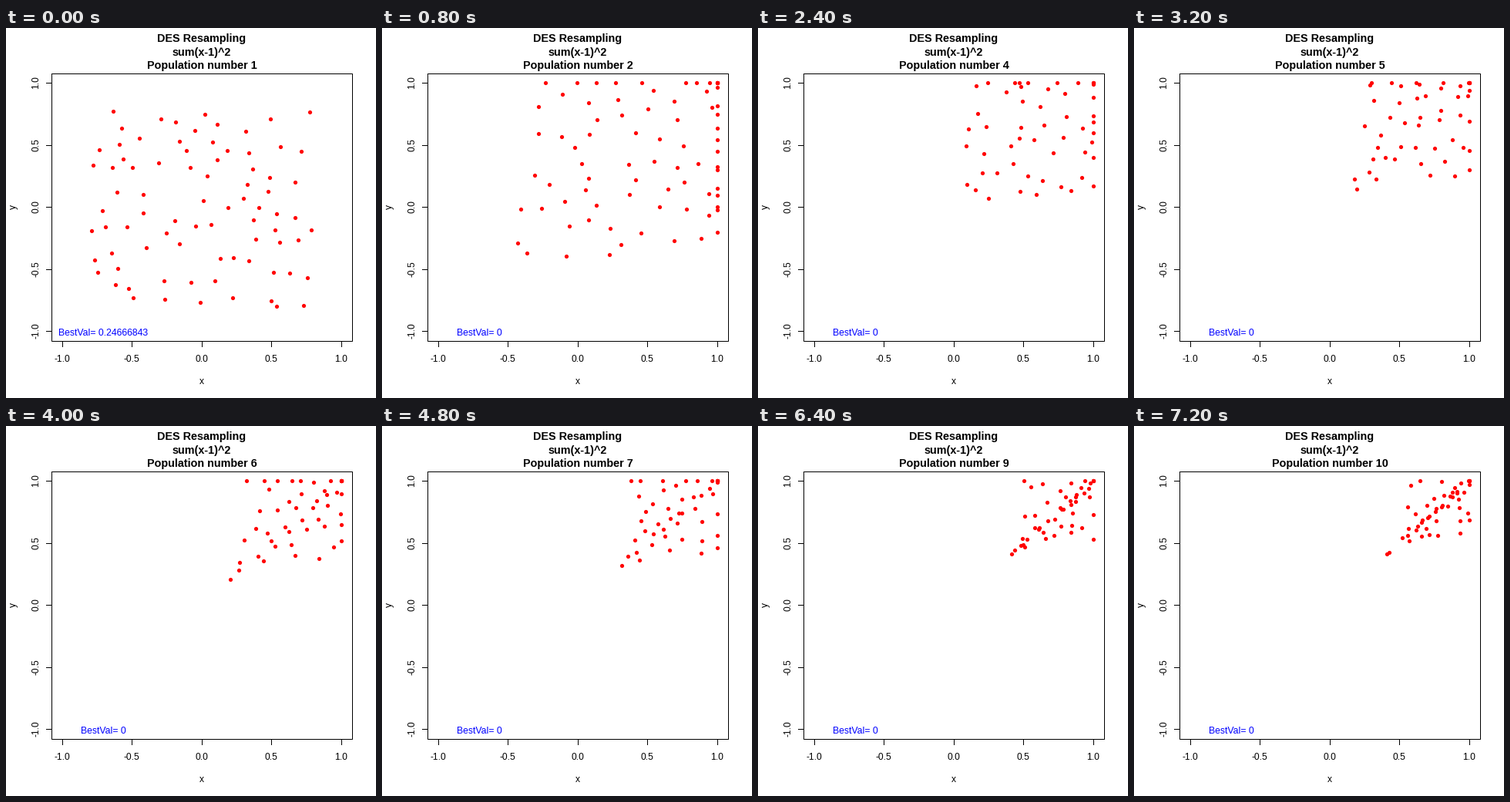
Animation, 480 px wide and 480 px high, one loop 8000 ms. Source, as a matplotlib script:

```python
import numpy as np
import matplotlib.pyplot as plt
from matplotlib.animation import FuncAnimation

SIZE = 480
GENERATIONS = 10
LEFT, TOP, RIGHT, BOTTOM = 59, 59, 449, 406

plt.rcParams["font.family"] = "Liberation Sans"


def to_px(x, y):
    """Plot coordinates to whole stage pixels, y pointing down."""
    return np.floor(254.4 + 180.9 * x), np.floor(232.8 - 160.9 * y)


def even_points(rng, count, tries=5):
    """Random points in the unit square that keep some distance."""
    points = rng.random((1, 2))
    while len(points) < count:
        picks = rng.random((tries, 2))
        gaps = np.linalg.norm(picks[:, None] - points, axis=2).min(axis=1)
        points = np.vstack([points, picks[gaps.argmax()]])
    return points


def population(g):
    """Square cloud that drifts to (1, 1), thins out and hugs the diagonal."""
    rng = np.random.default_rng(40 + g)
    if g == 0:
        return to_px(*(1.6 * even_points(rng, 80) - 0.8).T)

    count = round(48 + 29 * np.exp(-1.1 * (g - 1)))
    low = 0.035 * g - 0.05 - 0.45 * np.exp(-1.5 * (g - 1))
    high = 1.35 - 0.035 * (g - 1)
    pull = 1 + 0.25 * max(0, g - 3)

    a, b = even_points(rng, count).T
    along = ((a + b) / 2) ** pull ** -0.5
    across = 0.4 * np.sign(a - b) * np.abs(a - b) ** pull
    cloud = low + (high - low) * np.array([along + across, along - across])
    best = np.ones((2, 1))
    return to_px(*np.hstack([np.clip(cloud, low, 1), best]))


POPULATIONS = [np.column_stack(population(g)) for g in range(GENERATIONS)]

# At 72 dpi one point is one pixel.
fig = plt.figure(figsize=(SIZE / 72, SIZE / 72), dpi=72, facecolor="white")
ax = fig.add_axes([0, 0, 1, 1])
ax.set(xlim=(0, SIZE), ylim=(SIZE, 0))
ax.axis("off")


def line(xs, ys):
    ax.plot(np.array(xs) + 0.5, np.array(ys) + 0.5, color="black", lw=1,
            snap=False, solid_capstyle="projecting", solid_joinstyle="miter")


def label(x, y, text, size=12, **style):
    return ax.text(x, y, text, size=size, ha="center", va="baseline",
                   rotation_mode="anchor", **style)


def title(y, text=""):
    return label(254, y, text, 14.4, weight="bold")


line([LEFT, RIGHT, RIGHT, LEFT, LEFT], [TOP, TOP, BOTTOM, BOTTOM, TOP])
for value in np.arange(-1, 1.5, 0.5):
    x, y = to_px(value, value)
    line([x, x], [BOTTOM, BOTTOM + 7])
    line([LEFT - 7, LEFT], [y, y])
    label(x, 433, f"{value:.1f}")
    label(42.5, y, f"{value:.1f}", rotation=90)
label(253.5, 462, "x")
label(13, 232, "y", rotation=90)

title(18, "DES Resampling")
title(36, "sum(x-1)^2")
heading = title(53)
best_val = label(126, 399, "", 12.2, color="blue")
dots = ax.scatter([], [], s=5.2 ** 2, color="red", linewidths=0,
                  antialiased=False, zorder=3)


def draw(g):
    dots.set_offsets(POPULATIONS[g])
    heading.set_text(f"Population number {g + 1}")
    best_val.set_text("BestVal= " + ("0" if g else "0.24666843"))
    return dots, heading, best_val


anim = FuncAnimation(fig, draw, frames=GENERATIONS, interval=800, repeat=True)
plt.show()
```
